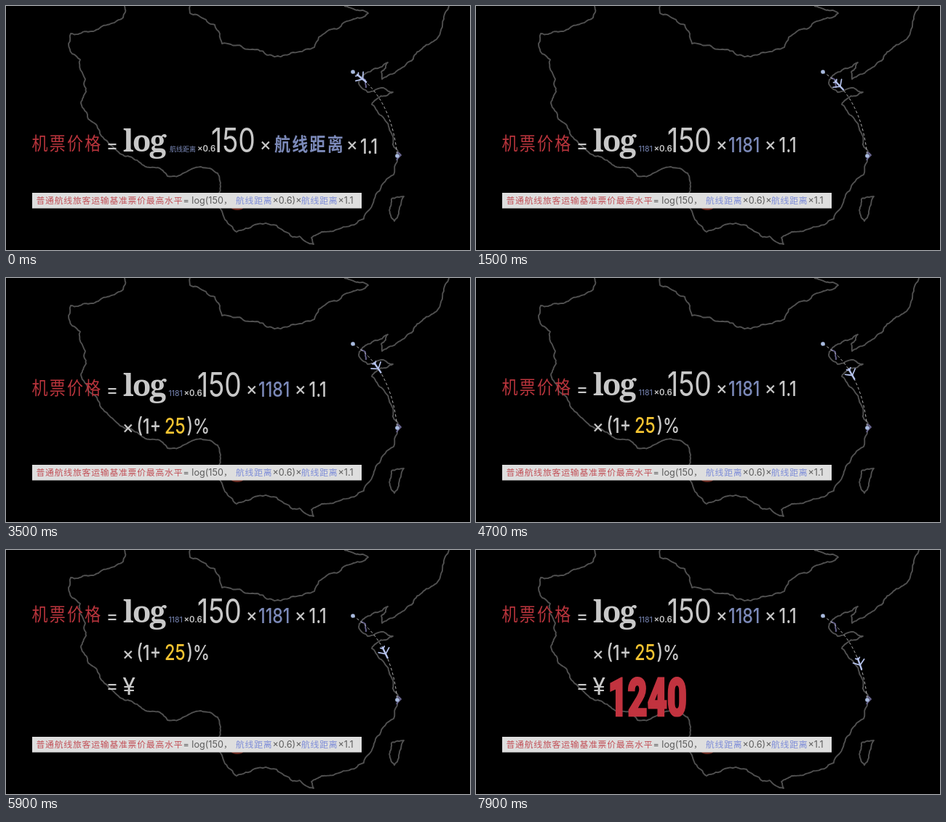
Recreate the animation shown at these times as an HTML page. Size 638 by 337 pixels, loop 8 s.

```html
<!DOCTYPE html>
<html lang="zh">
<head>
<meta charset="utf-8">
<title>Fare formula</title>
<style>
html, body { margin: 0; width: 100%; height: 100%; overflow: hidden; background: #000; }
svg { display: block; width: 100vw; height: 100vh; }
text { white-space: pre; }
.num { font-family: Inter, "Liberation Sans", sans-serif; }
.sign, .heavy { font-family: Roboto, "Liberation Sans", sans-serif; }
.cjk { font-family: "Noto Sans CJK SC", "Noto Sans CJK", sans-serif; }
.serif { font-family: "Noto Serif", serif; }
</style>
</head>
<body>
<svg id="stage" viewBox="0 0 638 337" xmlns="http://www.w3.org/2000/svg">
  <defs><clipPath id="reveal"><rect x="170" y="150" width="140" height="80.5"/></clipPath></defs>
  <rect width="638" height="337" fill="#000"/>
  <g id="map" fill="none" stroke="#505050" stroke-width="1.9" stroke-linejoin="round"></g>
  <ellipse cx="318" cy="279" rx="8" ry="3" fill="#6b2a20"/>
  <g id="route"></g>
  <g id="formula"></g>
  <g id="total" clip-path="url(#reveal)"></g>
  <g id="banner"></g>
</svg>
<script>
const LOOP = 8000;
const RED = '#b8343c', BLUE = '#7b89b8', LIGHT = '#c8c8c8', YELLOW = '#f3c331';
const $ = id => document.getElementById(id);

function add(parent, tag, attrs, content) {
  const el = document.createElementNS('http://www.w3.org/2000/svg', tag);
  for (const k in attrs) el.setAttribute(k, attrs[k]);
  if (content) el.textContent = content;
  parent.appendChild(el);
  return el;
}

const span = (t, a, b) => Math.max(0, Math.min(1, (t - a) / (b - a)));
const inOut = p => p < .5 ? 4 * p ** 3 : 1 - 4 * (1 - p) ** 3;
const out = p => 1 - (1 - p) ** 3;
const mix = (a, b, p) => a + (b - a) * p;

// ---- map: a few key points joined by seeded fractal lines
let seed = 11;
function rand() {
  seed = (seed * 16807) % 2147483647;
  return seed / 2147483647 - .5;
}
function fractal(a, b) {
  const dx = b[0] - a[0], dy = b[1] - a[1];
  if (Math.hypot(dx, dy) < 4) return [b];
  const r = rand() * .26;
  const mid = [(a[0] + b[0]) / 2 - dy * r, (a[1] + b[1]) / 2 + dx * r];
  return [...fractal(a, mid), ...fractal(mid, b)];
}
function border(points) {
  const keys = points.split(' ').map(s => s.split(',').map(Number));
  const line = keys.slice(1).flatMap((k, i) => fractal(keys[i], k));
  const d = 'M' + [keys[0], ...line].map(p => p.map(v => v.toFixed(1))).join('L');
  return add($('map'), 'path', { d });
}
border('163,0 161,16 127,32 89,38 86,52 91,66 102,74 109,101 103,134 113,156 133,181 155,202 187,219 222,235 268,222 291,231 295,249 289,272 301,295 317,312 342,302 372,303 394,319 404,318');
border('253,0 253,10 287,26 297,52 345,60 378,70 424,57 430,43 478,18 498,10 465,0');
border('609,0 602,18 592,46 560,73 517,101 516,91 525,78 508,86 485,106 497,119 519,113 532,119 503,136 529,174 542,205 533,233 500,281 450,311 420,320 423,329 413,326 404,318');
border('530,266 547,263 540,287 534,297 527,282 530,266');
for (const city of ['537,202 543,206 537,213', '488,99 494,102 495,113']) {
  border(city).setAttribute('stroke', '#66628c');
}

// ---- flight route
const A = [477, 91], C = [530, 125], B = [538, 207];
const bend = (i, u) => (1 - u) ** 2 * A[i] + 2 * u * (1 - u) * C[i] + u * u * B[i];
const slope = (i, u) => (1 - u) * (C[i] - A[i]) + u * (B[i] - C[i]);
add($('route'), 'path', {
  d: `M${A}Q${C} ${B}`, fill: 'none', stroke: '#b8b8b8', 'stroke-width': 1, 'stroke-dasharray': '3.5 3'
});
for (const [x, y] of [A, B]) add($('route'), 'circle', { cx: x, cy: y, r: 2.8, fill: '#a9bbdf' });
const plane = add($('route'), 'g', { fill: 'none', stroke: '#b5c2ec', 'stroke-linecap': 'round' });
add(plane, 'path', { d: 'M-8 0H8', 'stroke-width': 2.4 });
add(plane, 'path', { d: 'M-4-8L2 0L-4 8M-8.5-3L-6 0L-8.5 3', 'stroke-width': 1.7 });

// ---- text: each label is a group placed by its left edge and baseline
function label(parent, text, x, y, size, fill, style) {
  const { face = 'num', weight = 400, gap = 0, narrow = 1 } = style;
  const g = add(parent, 'g', {});
  add(g, 'text', {
    class: face, 'font-size': size, fill, 'font-weight': weight,
    'letter-spacing': gap, transform: `scale(${narrow} 1)`
  }, text);
  g.place = (px, py, alpha = 1) => {
    g.setAttribute('transform', `translate(${px.toFixed(2)} ${py.toFixed(2)})`);
    g.setAttribute('opacity', alpha);
  };
  g.place(x, y);
  return g;
}
const digits = { weight: 500, narrow: .8 };
const large = { weight: 400, narrow: .81 };
const sign = { face: 'sign', weight: 400 };
const term = { face: 'cjk', weight: 500, gap: 2.6, narrow: .88 };
const F = $('formula');
const times = (parent, x, y) => label(parent, '×', x, y, 26, LIGHT, sign);
const equals = (parent, y) => label(parent, '=', 138.5, y, 27, LIGHT, sign);

label(F, '机票价格', 35.5, 199, 25, RED, term);
equals(F, 203);
label(F, 'log', 161, 200.5, 42, LIGHT, { face: 'serif', weight: 700, gap: -2 });
const subWord = label(F, '航线距离', 225, 201, 9, BLUE, { face: 'cjk' });
const subNum = label(F, '1181', 223.5, 201, 10.5, BLUE, {});
const subMul = label(F, '×0.6', 263, 201, 11.3, LIGHT, { weight: 600 });
const base = label(F, '150', 282, 202, 46, LIGHT, large);
const mulA = times(F, 350, 200.5);
const word = label(F, '航线距离', 369, 199.5, 25, BLUE, { ...term, weight: 700 });
const num = label(F, '1181', 347, 201.5, 29, BLUE, digits);
const mulB = times(F, 469, 200.5);
const rate = label(F, '1.1', 487, 201.5, 29, LIGHT, digits);

const row2 = add(F, 'g', {});
times(row2, 161, 253.5);
label(row2, '(1+', 179.5, 252.5, 29, LIGHT, digits);
label(row2, ')%', 248.5, 252.5, 29, LIGHT, digits);
const extra = label(F, '25', 218, 252.5, 29.5, YELLOW, digits);

const row3 = add(F, 'g', {});
equals(row3, 299);
label(row3, '¥', 160.5, 301, 33, LIGHT, sign);

const total = label($('total'), '1240', 181.5, 228.5, 72, '#c2333f', { face: 'heavy', weight: 900, narrow: .65 });
total.setAttribute('stroke', '#c2333f');
total.setAttribute('stroke-width', 3);

// ---- rule banner
const GREY = '#5c5c5c', PALE_BLUE = '#7d8cd8';
add($('banner'), 'rect', { x: 36, y: 258, width: 453, height: 21.5, fill: '#dedede' });
const han = (s, x, fill) => label($('banner'), s, x, 273, 11.9, fill, { face: 'cjk', gap: .72 });
const latin = (s, x) => label($('banner'), s, x, 273, 12.6, GREY, {});
han('普通航线旅客运输基准票价最高水平', 41.5, '#c25057');
latin('= log(150', 243.5);
han('，', 301 - 2, GREY);
han('航线距离', 316, PALE_BLUE);
latin('×0.6)×', 366.5);
han('航线距离', 406, PALE_BLUE);
latin('×1.1', 456.5);

function draw(t) {
  const s = t / 1000;
  const u = .12 + .079 * s - .0013 * s * s;
  const angle = Math.atan2(slope(1, u), slope(0, u)) * 180 / Math.PI;
  plane.setAttribute('transform', `translate(${bend(0, u).toFixed(2)} ${bend(1, u).toFixed(2)}) rotate(${angle.toFixed(2)})`);

  // the distance words give way to their value
  const swap = inOut(span(t, 700, 1200));
  subWord.place(225, 201, 1 - swap);
  subNum.place(223.5, 201, swap);
  word.place(mix(369, 347, swap), 199.5, 1 - swap);
  num.place(347, 201.5, swap);
  subMul.place(mix(263, 244.5, swap), 201);
  base.place(mix(282, 263, swap), 202);
  mulA.place(mix(350, 331, swap), 200.5);
  mulB.place(mix(469, 398, swap), 200.5);
  rate.place(mix(487, 416.5, swap), 201.5 + 3 * (1 - out(span(t, 0, 400))));

  const lift = 38 * inOut(span(t, 1600, 2500)) + 63 * inOut(span(t, 4500, 6000));
  F.setAttribute('transform', `translate(0 ${(-lift).toFixed(2)})`);

  row2.setAttribute('opacity', span(t, 1800, 2150));
  extra.place(218, 252.5 + 28 * (1 - out(span(t, 1900, 2700))), span(t, 1900, 2200));
  row3.setAttribute('opacity', span(t, 4800, 5200));
  total.place(181.5, 228.5 + 60 * (1 - out(span(t, 6300, 6950))), t < 6300 ? 0 : 1);
}

function tick(now) {
  draw(now % LOOP);
  requestAnimationFrame(tick);
}
draw(0);
requestAnimationFrame(tick);
</script>
</body>
</html>
```
